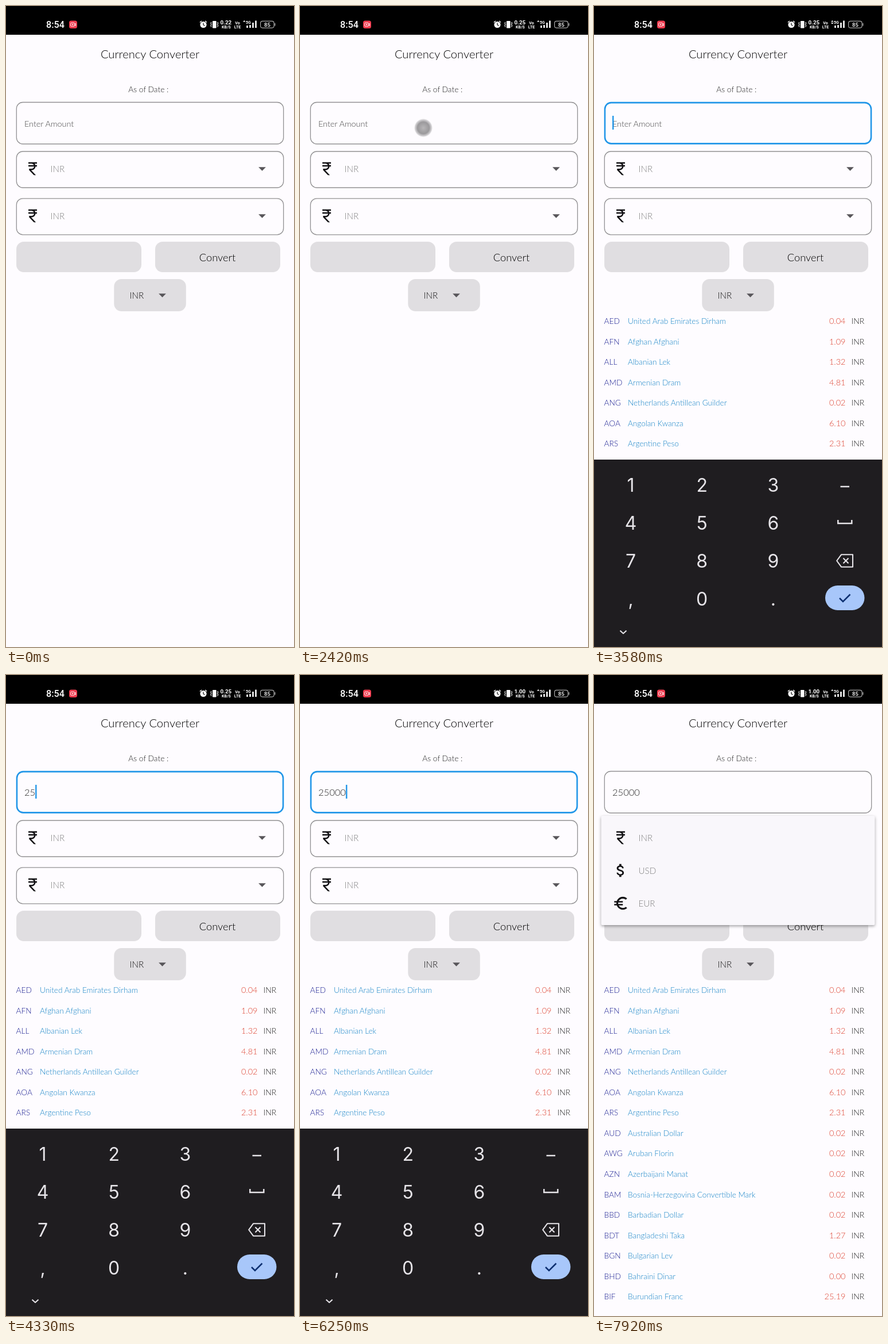
Recreate the animation shown at these times as an HTML page. Size 502x1115 px, loop 8 s.

```html
<!DOCTYPE html>
<html lang="en">
<head>
<meta charset="utf-8">
<title>Currency Converter</title>
<style>
html, body { margin: 0; width: 100%; height: 100%; overflow: hidden; background: #fefcff; }
svg { display: block; width: 100%; height: 100%; }
text { font-family: Lato, sans-serif; font-weight: 300; font-size: 14px; white-space: pre; }
.mid { text-anchor: middle; }
.end { text-anchor: end; }

.status text { font-family: Roboto, sans-serif; font-weight: 500; fill: #fff; }
.status .clock { font-size: 16.2px; }
.status .tiny { font-weight: 700; font-size: 7px; }
.status .rate { font-weight: 700; font-size: 9.8px; }
.status .charge { font-size: 9.5px; }

.title { font-size: 20.2px; fill: #000; }
.date { font-size: 13.8px; fill: #222; }
.hint { font-size: 14.4px; fill: #444; }
.typed { font-size: 16.5px; fill: #222; }
.inr { font-size: 15.2px; fill: #808080; }
.pick { font-size: 15.2px; fill: #111; }
.go { font-size: 18.3px; fill: #000; }
.box { fill: none; stroke: #929193; stroke-width: 1.3; }
.btn { fill: #e0dee1; }
.arrow { fill: #58565a; }
.icon { fill: #131215; }

.code { font-size: 13.7px; fill: #1a1f92; }
.name { font-size: 13.6px; fill: #1483c6; }
.val { font-size: 14.5px; fill: #dc3d2b; }
.unit { fill: #222; }

.keys text { font-family: Inter, sans-serif; font-weight: 400; font-size: 32px; fill: #e6e4e8; text-anchor: middle; }
.line { fill: none; stroke: #e6e4e8; stroke-width: 2.5; }
.thin { stroke-width: 2.1; stroke-linejoin: round; }

/* One loop is 8 s, so 1% is 80 ms. */
.field, .keys, .menu, .sheet, .late { animation: 8s linear infinite both; }
.hint, .typed tspan, .cursor, .touch, .list, .step { animation: 8s step-end infinite both; }

/* The outer edge stays put while the border thickens inwards. */
.field { animation-name: focus; }
@keyframes focus {
  0%, 30.875% { stroke: #929193; stroke-width: 1.3px; x: 18.3px; y: 167.5px; width: 465.4px; height: 72.5px; }
  32.96%, 85.25% { stroke: #2196e8; stroke-width: 2.6px; x: 18.95px; y: 168.15px; width: 464.1px; height: 71.2px; }
  87.3%, 100% { stroke: #929193; stroke-width: 1.3px; x: 18.3px; y: 167.5px; width: 465.4px; height: 72.5px; }
}
.keys { animation-name: slide; }
@keyframes slide {
  0% { transform: translateY(327px); }
  30.5% { transform: translateY(327px); animation-timing-function: cubic-bezier(.33, 1, .68, 1); }
  33.84% { transform: none; }
  85.6% { transform: none; animation-timing-function: cubic-bezier(.32, 0, .67, 0); }
  88.75%, 100% { transform: translateY(327px); }
}
.list { animation-name: list; }
@keyframes list { 0% { opacity: 0; } 37.5%, 100% { opacity: 1; } }

.hint { animation-name: hint; }
@keyframes hint { 0% { opacity: 1; } 46.875%, 100% { opacity: 0; } }
.typed :nth-child(1) { animation-name: t1; }
.typed :nth-child(2) { animation-name: t2; }
.typed :nth-child(3) { animation-name: t3; }
.typed :nth-child(4) { animation-name: t4; }
.typed :nth-child(5) { animation-name: t5; }
@keyframes t1 { 0% { fill-opacity: 0; } 46.875%, 100% { fill-opacity: 1; } }
@keyframes t2 { 0% { fill-opacity: 0; } 51.5%, 100% { fill-opacity: 1; } }
@keyframes t3 { 0% { fill-opacity: 0; } 55.6%, 100% { fill-opacity: 1; } }
@keyframes t4 { 0% { fill-opacity: 0; } 58.75%, 100% { fill-opacity: 1; } }
@keyframes t5 { 0% { fill-opacity: 0; } 64.1%, 100% { fill-opacity: 1; } }

.cursor { fill: #2196e8; animation-name: cursor; }
@keyframes cursor {
  0% { opacity: 0; transform: none; }
  30.875% { opacity: 1; transform: none; }
  37.1% { opacity: 0; transform: none; }
  43.35% { opacity: 1; transform: none; }
  46.875% { opacity: 1; transform: translateX(9.6px); }
  51.5% { opacity: 1; transform: translateX(19.1px); }
  55.6% { opacity: 1; transform: translateX(28.7px); }
  58.75% { opacity: 1; transform: translateX(38.3px); }
  64.1% { opacity: 1; transform: translateX(47.9px); }
  70.4% { opacity: 0; transform: translateX(47.9px); }
  76.6% { opacity: 1; transform: translateX(47.9px); }
  82.9%, 100% { opacity: 0; transform: translateX(47.9px); }
}
.touch { animation-name: tap; }
@keyframes tap {
  0%, 30.5%, 46.75%, 51.4%, 55.5%, 58.6%, 64%, 85%, 100% { opacity: 0; transform: none; }
  29.1% { opacity: 1; transform: translate(215px, 212px); }
  45.25% { opacity: 1; transform: translate(205px, 845px); }
  49.9% { opacity: 1; transform: translate(203px, 912px); }
  54.25% { opacity: 1; transform: translate(208px, 1042px); }
  57.4% { opacity: 1; transform: translate(208px, 1045px); }
  61% { opacity: 1; transform: translate(212.5px, 1034px); }
  83.6% { opacity: 1; transform: translate(230px, 285px); }
}

.menu { animation-name: open; }
@keyframes open { 0%, 85.4% { opacity: 0; } 86.3%, 100% { opacity: 1; } }
.sheet {
  x: 12.5px; width: 477px; fill: #f9f7fb;
  filter: drop-shadow(0 2px 2.5px rgba(0, 0, 0, .36));
  animation-name: grow;
}
@keyframes grow {
  0%, 86.3% { y: 254px; height: 57px; }
  88%, 100% { y: 245px; height: 190px; }
}
.late { animation-name: late; }
.late + .late { animation-delay: 60ms; }
@keyframes late { 0%, 86.5% { opacity: 0; } 88.2%, 100% { opacity: 1; } }

.n1 { animation-name: n1; }
.n2 { animation-name: n2; }
.n3 { animation-name: n3; }
.up { animation-name: up; }
.down { animation-name: down; }
@keyframes n1 { 0% { opacity: 1; } 12.5%, 100% { opacity: 0; } }
@keyframes n2 { 0%, 68.75%, 100% { opacity: 0; } 12.5% { opacity: 1; } }
@keyframes n3 { 0% { opacity: 0; } 68.75%, 100% { opacity: 1; } }
@keyframes up { 0%, 68.75%, 100% { opacity: 1; } 53% { opacity: .4; } }
@keyframes down { 0%, 53%, 100% { opacity: 0; } 31.25% { opacity: 1; } }
</style>
</head>
<body>
<svg viewBox="0 0 502 1115">
  <defs>
    <radialGradient id="glow">
      <stop offset="0" stop-color="#b0aeb0" stop-opacity=".9"/>
      <stop offset=".65" stop-color="#908e91" stop-opacity=".9"/>
      <stop offset=".78" stop-color="#a5a3a6" stop-opacity=".75"/>
      <stop offset="1" stop-color="#777" stop-opacity="0"/>
    </radialGradient>
    <path id="rupee" d="M13.66 7C13.1 5.82 11.9 5 10.5 5H6V3h12v2h-3.26c.48.58.84 1.26 1.05 2H18v2h-2.02c-.25 2.8-2.61 5-5.48 5h-.73l6.73 7h-2.77L7 14v-2h3.5c1.76 0 3.22-1.3 3.46-3H6V7z"/>
    <path id="dollar" d="M11.8 10.9c-2.27-.59-3-1.2-3-2.15 0-1.09 1.01-1.85 2.7-1.85 1.78 0 2.44.85 2.5 2.1h2.21c-.07-1.72-1.12-3.3-3.21-3.81V3h-3v2.16c-1.94.42-3.5 1.68-3.5 3.61 0 2.31 1.91 3.46 4.7 4.13 2.5.6 3 1.48 3 2.41 0 .69-.49 1.79-2.7 1.79-2.06 0-2.87-.92-2.98-2.1h-2.2c.12 2.19 1.76 3.42 3.68 3.83V21h3v-2.15c1.95-.37 3.5-1.5 3.5-3.55 0-2.84-2.43-3.81-4.7-4.4z"/>
    <path id="euro" d="M15 18.5c-2.51 0-4.68-1.42-5.76-3.5H15v-2H8.58a7 7 0 0 1 0-2H15V9H9.24C10.32 6.92 12.5 5.5 15 5.5c1.61 0 3.09.59 4.23 1.57L21 5.3A9 9 0 0 0 6.52 9H3v2h3.06a8 8 0 0 0 0 2H3v2h3.52A9 9 0 0 0 21 18.7l-1.78-1.77c-1.13.98-2.6 1.57-4.22 1.57z"/>
    <path id="drop" class="arrow" d="M-6.4-3.2H6.4L0 3.2z"/>
  </defs>

  <rect width="502" height="1115" fill="#fefcff"/>

  <g class="status">
    <rect width="502" height="50"/>
    <text class="clock" x="70" y="38">8:54</text>
    <rect x="110" y="25.5" width="14" height="13.5" rx="3.5" fill="#ee3a4e"/>
    <g fill="none" stroke="#fff" stroke-width=".9">
      <rect x="112.7" y="29.3" width="6.6" height="6" rx="1.2"/>
      <path d="M119.3 31.6l2.2-1.2v4l-2.2-1.2"/>
    </g>
    <circle cx="116" cy="32.3" r="1.1" fill="#fff"/>

    <circle cx="344" cy="32.5" r="5.6" fill="#fff"/>
    <path d="M338 28.5l3-2.5M350 28.5l-3-2.5" stroke="#fff" stroke-width="1.5"/>
    <path d="M344 29.3v3.4l2.4 1.5" stroke="#000" stroke-width="1.1" fill="none"/>

    <rect x="360" y="26" width="6.6" height="12.5" rx="1" fill="#fff"/>
    <path d="M358 28l-1 2 1 2-1 2 1 2.5M368.6 28l1 2-1 2 1 2-1 2.5" stroke="#fff" stroke-width="1.1" fill="none"/>

    <text class="rate mid step n1" x="383.3" y="32">0.22</text>
    <text class="rate mid step n2" x="383.3" y="32">0.25</text>
    <text class="rate mid step n3" x="383.3" y="32">1.00</text>
    <text class="tiny mid" x="384" y="39.3">KB/S</text>
    <text class="tiny mid" x="403.5" y="31.5">Vo</text>
    <text class="tiny mid" x="403.5" y="38.5">LTE</text>

    <path class="step up" d="M413 27.5l2.3-2.5 2.3 2.5z" fill="#fff"/>
    <path class="step down" d="M413 29l2.3 2.5 2.3-2.5z" fill="#fff"/>
    <text class="tiny" x="418" y="31">5G</text>
    <path d="M420.5 38v-4M425.500 38v-5M430.500 38v-9M435.500 38v-12.500" stroke="#fff" stroke-width="2.6"/>

    <rect x="443.6" y="26.3" width="23.5" height="11.8" rx="3.5" fill="none" stroke="#aaa" stroke-width="1.2"/>
    <path d="M468.8 30v4.5" stroke="#aaa" stroke-width="1.3"/>
    <text class="charge mid" x="455.4" y="35.6">85</text>
  </g>

  <text class="title mid" x="251" y="91">Currency Converter</text>
  <text class="date mid" x="248.3" y="149.5">As of Date :</text>

  <rect class="box field" rx="11"/>
  <text class="hint" x="32" y="210">Enter Amount</text>
  <text class="typed" x="32" y="210"><tspan>2</tspan><tspan>5</tspan><tspan>0</tspan><tspan>0</tspan><tspan>0</tspan></text>
  <rect class="cursor" x="32" y="191" width="2.4" height="24"/>

  <rect class="box" x="18.3" y="253" width="465.4" height="63" rx="11"/>
  <rect class="box" x="18.3" y="334.8" width="465.4" height="63" rx="11"/>
  <use href="#drop" x="446.5" y="283.5"/>
  <use href="#drop" x="446.5" y="365.5"/>
  <g id="chosen"></g>

  <rect class="btn" x="18" y="410" width="218" height="53" rx="13"/>
  <rect class="btn" x="260" y="410" width="218" height="53" rx="13"/>
  <text class="go mid" x="368.5" y="444">Convert</text>
  <rect class="btn" x="188.3" y="475" width="125.5" height="56" rx="13"/>
  <text class="pick" x="215.5" y="509">INR</text>
  <use href="#drop" x="272.5" y="503.5"/>

  <g class="list" id="list"></g>

  <g class="menu">
    <rect class="sheet" rx="2"/>
    <g id="options"></g>
  </g>

  <g class="keys">
    <rect y="789" width="502" height="330" fill="#1f1d20"/>
    <g id="digits"></g>
    <path class="line" d="M429.5 836H445M425.3 894v6h24v-6"/>
    <path class="line thin" d="M431 954.3h20v21.4h-20l-7.8-10.7zM434.5 960.5l9 9m0-9l-9 9"/>
    <rect x="403" y="1008" width="68.5" height="43" rx="21.5" fill="#a8c7fa"/>
    <path d="M428 1030l6 6 12.5-12.5" fill="none" stroke="#0b2f70" stroke-width="2.5"/>
    <path class="line thin" d="M45.5 1086.5l5.5 5 5.5-5"/>
  </g>

  <circle class="touch" r="16" fill="url(#glow)"/>
</svg>
<script>
const rates = `AED|United Arab Emirates Dirham|0.04
AFN|Afghan Afghani|1.09
ALL|Albanian Lek|1.32
AMD|Armenian Dram|4.81
ANG|Netherlands Antillean Guilder|0.02
AOA|Angolan Kwanza|6.10
ARS|Argentine Peso|2.31
AUD|Australian Dollar|0.02
AWG|Aruban Florin|0.02
AZN|Azerbaijani Manat|0.02
BAM|Bosnia-Herzegovina Convertible Mark|0.02
BBD|Barbadian Dollar|0.02
BDT|Bangladeshi Taka|1.27
BGN|Bulgarian Lev|0.02
BHD|Bahraini Dinar|0.00
BIF|Burundian Franc|25.19`;

const fill = (id, html) => { document.getElementById(id).innerHTML = html; };
const label = (cls, x, y, s) => `<text class="${cls}" x="${x}" y="${y}">${s}</text>`;
const option = (icon, code, y, cls = '') =>
  `<g class="${cls}"><use class="icon" href="#${icon}" transform="translate(31.5 ${y - 15}) scale(1.25)"/>` +
  label('inr', 77.5, y + 5.5, code) + '</g>';

fill('list', rates.split('\n').map((row, i) => {
  const [code, name, rate] = row.split('|');
  const y = 553 + i * 35.55;
  return label('code', 17.5, y, code) + label('name', 59, y, name) +
    label('val end', 438.5, y, rate) + label('unit', 448.5, y, 'INR');
}).join(''));

fill('chosen', option('rupee', 'INR', 283) + option('rupee', 'INR', 365));
fill('options', option('rupee', 'INR', 283) +
  option('dollar', 'USD', 340, 'late') + option('euro', 'EUR', 397, 'late'));

fill('digits', [...'123456789,0.'].map((key, i) =>
  label('', 64 + (i % 3) * 124.2, 845 + Math.floor(i / 3) * 66, key)).join(''));
</script>
</body>
</html>
```
